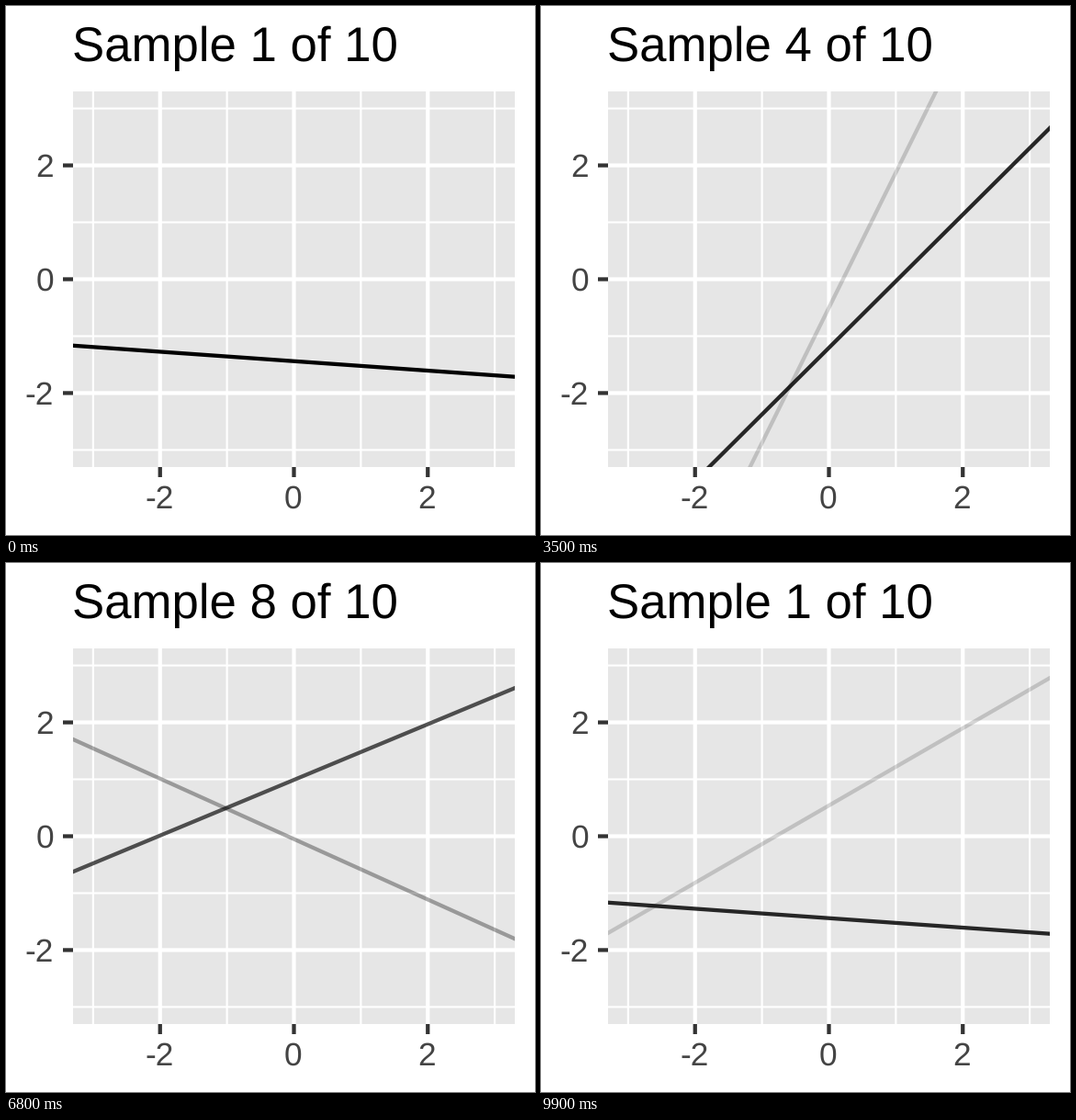
A matplotlib script that plays this animation: 576x576 px, repeating every 10000 ms.

```python
import matplotlib.pyplot as plt
from matplotlib.animation import FuncAnimation
from matplotlib.patches import Rectangle

plt.rcParams["font.family"] = "Liberation Sans"
plt.rcParams["text.hinting"] = "none"

SIZE = 576
DPI = 72  # one point equals one pixel
LEFT, RIGHT, TOP, BOTTOM = 73, 554, 93, 502
LIMIT = 3.3  # both axes run from -LIMIT to LIMIT
STROKE = 4.27
TICK = 11
LABEL_SIZE = 35.2
STEPS = 10  # animation frames per sample

# Sampled lines as (intercept, slope)
SAMPLES = [(-1.44, -0.083), (-1.03, -0.466), (-2.17, 0.309), (-1.205, 1.17),
           (-0.5, 2.375), (1.84, -0.659), (-0.05, -0.531), (0.99, 0.489),
           (1.08, -0.883), (0.54, 0.679)]

fig = plt.figure(figsize=(SIZE / DPI, SIZE / DPI), dpi=DPI, facecolor="white")
ax = fig.add_axes([0, 0, 1, 1])
ax.set_xlim(0, SIZE)
ax.set_ylim(SIZE, 0)
ax.axis("off")


def to_x(value):
    return LEFT + (value + LIMIT) / (2 * LIMIT) * (RIGHT - LEFT)


def to_y(value):
    return BOTTOM - (value + LIMIT) / (2 * LIMIT) * (BOTTOM - TOP)


def stroke(xs, ys, color, width=STROKE, z=2):
    line, = ax.plot(xs, ys, color=color, lw=width, zorder=z, snap=False,
                    solid_capstyle="butt")
    return line


def label(x, y, text, size=LABEL_SIZE, color="#444444"):
    return ax.text(x, y, text, fontsize=size, color=color,
                   ha="left", va="baseline")


def draw_grid(values, width, z):
    for v in values:
        stroke([to_x(v)] * 2, [TOP, BOTTOM], "white", width, z)
        stroke([LEFT, RIGHT], [to_y(v)] * 2, "white", width, z)


def draw_ticks(values):
    for v in values:
        x, y = to_x(v), to_y(v)
        stroke([x, x], [BOTTOM, BOTTOM + TICK], "#333333")
        stroke([LEFT - TICK, LEFT], [y, y], "#333333")
        # advance widths of a digit and a hyphen
        width = LABEL_SIZE * (0.556 + (0.333 if v < 0 else 0))
        label(x - width / 2 - 1, 547, str(v))
        label(52.2 - width, y + 12.6, str(v))


panel = Rectangle((LEFT, TOP), RIGHT - LEFT, BOTTOM - TOP,
                  fc="#E6E6E6", ec="none", zorder=0)
ax.add_patch(panel)
draw_grid(range(-3, 4, 2), STROKE / 2, 1)
draw_grid(range(-2, 3, 2), STROKE, 2)
draw_ticks(range(-2, 3, 2))

title = label(LEFT - 1, 60, "", 52.8, "black")
leaving = stroke([], [], "black", z=3)
arriving = stroke([], [], "black", z=4)
for item in (leaving, arriving):
    item.set_clip_path(panel)


def place(line, sample, alpha):
    intercept, slope = SAMPLES[sample]
    ends = (-LIMIT - 0.2, LIMIT + 0.2)
    line.set_data([to_x(v) for v in ends],
                  [to_y(intercept + slope * v) for v in ends])
    line.set_alpha(alpha)


def update(frame):
    current, step = divmod(frame, STEPS)
    following = (current + 1) % len(SAMPLES)
    hold = 3 if current == 0 else 4
    fade = max(0, step - hold) / (STEPS - hold)
    place(leaving, current, 1 - fade)
    place(arriving, following, fade)
    nearest = following if fade > 0.5 else current
    title.set_text(f"Sample {nearest + 1} of {len(SAMPLES)}")
    return leaving, arriving, title


anim = FuncAnimation(fig, update, frames=STEPS * len(SAMPLES), interval=100,
                     repeat=True, repeat_delay=0)
plt.show()
```
